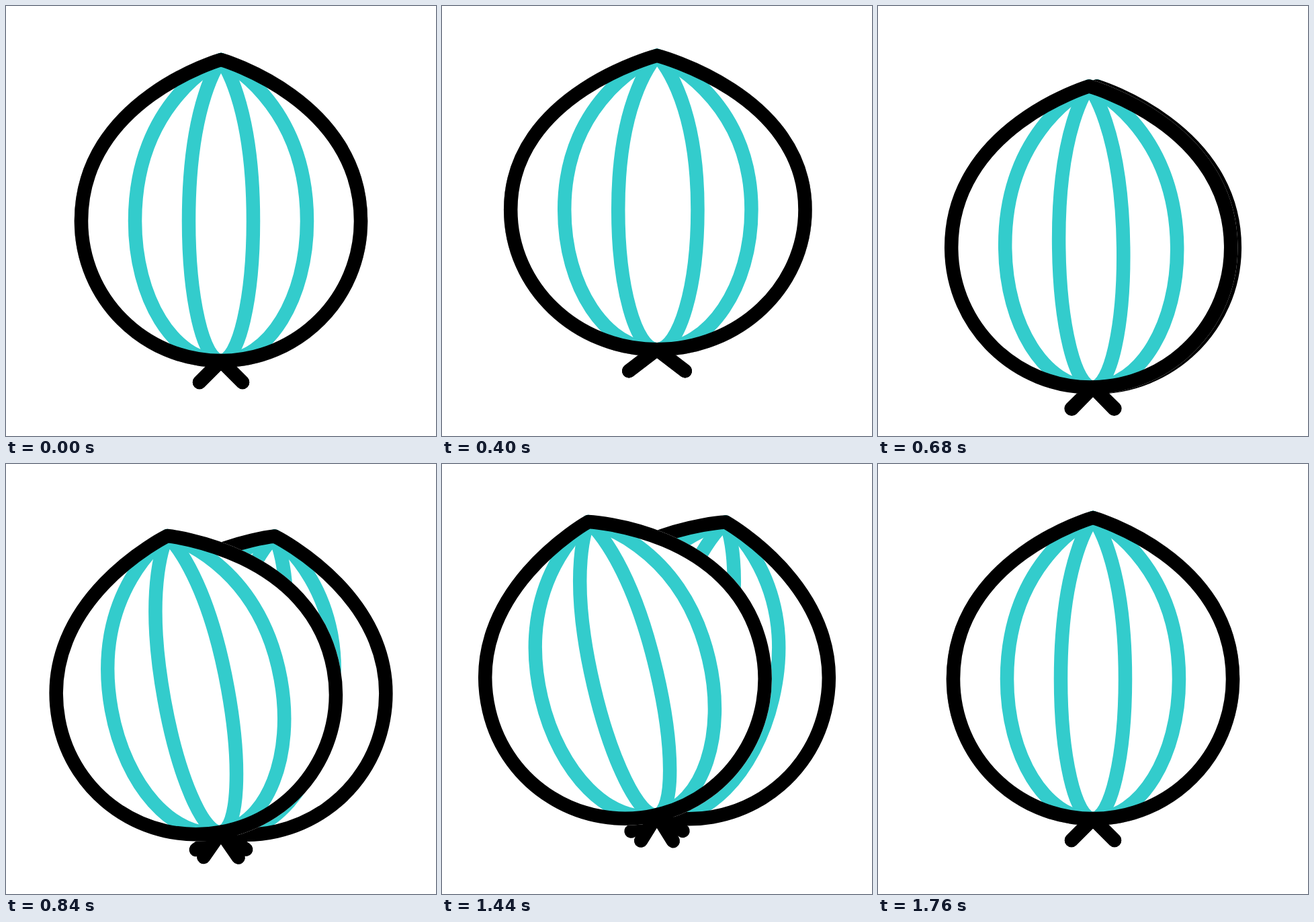
These frames come from a looping animation (640 px wide and 640 px high, 2000 ms). An HTML page:

```html
<!DOCTYPE html>
<html lang="en">
<head>
<meta charset="utf-8">
<title>Striped bulb</title>
<style>
html, body { margin: 0; width: 100%; height: 100%; overflow: hidden; background: #fff; }
svg { display: block; width: 100vw; height: 100vh; }
</style>
</head>
<body>
<svg viewBox="0 0 640 640" fill="none" stroke-width="20.5" stroke-linecap="round" stroke-linejoin="round">
  <defs>
    <g id="bulb">
      <path class="body" fill="#fff" stroke="#fff"/>
      <path class="wide" stroke="#33cccc"/>
      <path class="thin" stroke="#33cccc"/>
      <path class="body" stroke="#000"/>
      <path class="legs" stroke="#000"/>
    </g>
  </defs>
  <use href="#bulb" id="back"/>
  <use href="#bulb" id="front"/>
</svg>
<script>
const LOOP = 2000, STEP = 40;
const KAPPA = 0.5523, R = 208;

// Keys: [ms, value], linear in between
const KEYS = {
  y: [[133, 528], [367, 504], [667, 569], [1067, 520], [1333, 520], [1733, 528]],
  turn: [[667, 0], [970, 18], [1333, 18], [1733, 0]],
  puff: [[133, 0], [367, 1], [667, 0]]
};
const SINK = 0.045; // the back bulb sits slightly lower as it turns

function at(keys, t) {
  if (t <= keys[0][0]) return keys[0][1];
  for (let i = 1; i < keys.length; i++) {
    const [t0, a] = keys[i - 1], [t1, b] = keys[i];
    if (t < t1) return a + (b - a) * (t - t0) / (t1 - t0);
  }
  return keys[keys.length - 1][1];
}

const set = (sel, name, value) =>
  document.querySelectorAll(sel).forEach(el => el.setAttribute(name, value));

// Closed onion curve; its bottom point is the origin
function onion(half, puff) {
  const l = -half - 11 * puff, r = half + 14 * puff;
  const top = -448 + 12 * puff, shoulder = -388 + 9 * puff;
  const k = R * KAPPA;
  return `M0 ${top}C0 ${top} ${l} ${shoulder} ${l} ${-R}` +
    `C${l} ${k - R} ${l * KAPPA} 0 0 0` +
    `C${r * KAPPA} 0 ${r} ${k - R} ${r} ${-R}` +
    `C${r} ${shoulder} 0 ${top} 0 ${top}Z`;
}

function draw(t) {
  const puff = at(KEYS.puff, t), turn = at(KEYS.turn, t), y = at(KEYS.y, t);
  const leg = 32 + 11 * puff;
  set('.body', 'd', onion(R, puff));
  set('.wide', 'd', onion(128, puff));
  set('.thin', 'd', onion(48, puff));
  set('.legs', 'd', `M${-leg} 32L0 0L${leg} 32`);
  set('#front', 'transform', `translate(320 ${y}) rotate(${-turn})`);
  set('#back', 'transform', `translate(320 ${y + SINK * turn}) rotate(${turn})`);
}

const start = performance.now();
function tick() {
  const t = (performance.now() - start) % LOOP;
  draw(Math.floor(t / STEP) * STEP);
  requestAnimationFrame(tick);
}
tick();
</script>
</body>
</html>
```
